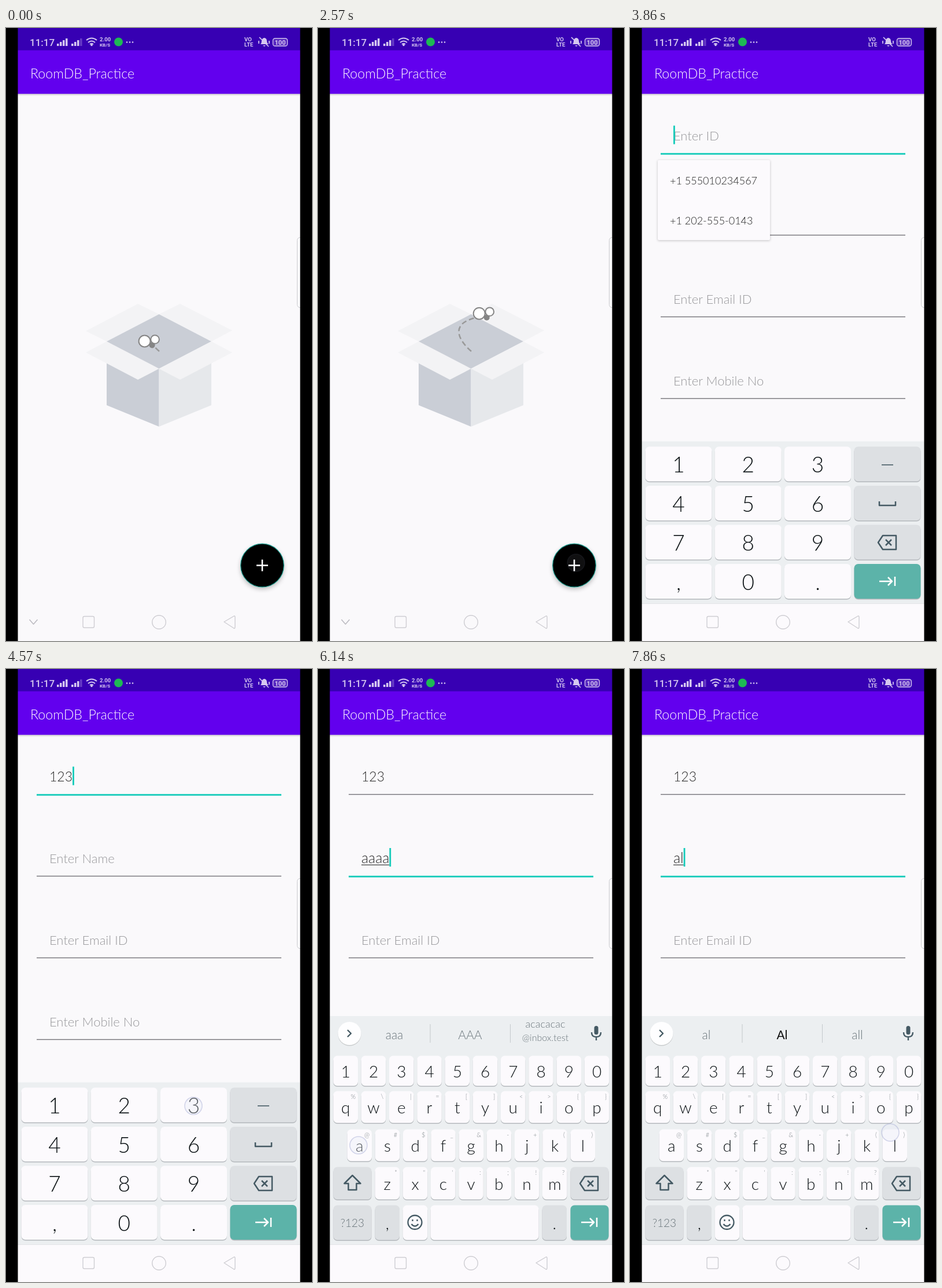
Animation, 529 px wide and 1058 px high, one loop 8 s. Source, as an HTML page:

```html
<!DOCTYPE html>
<html lang="en">
<head>
<meta charset="utf-8">
<title>Room database form</title>
<style>
  html, body { margin: 0; width: 100%; height: 100%; overflow: hidden; background: #000; }
  svg { display: block; width: 100vw; height: 100vh; }
  text { font-family: Lato, sans-serif; font-weight: 300; }
  .status text { font-family: Roboto, sans-serif; font-weight: 500; }
  .status .small { font-weight: 700; }
  .line { fill: none; stroke-linejoin: round; }
</style>
</head>
<body>
<svg id="stage" viewBox="0 0 529 1058"></svg>
<script>
const stage = document.getElementById('stage');
const INK = '#455a64', TEAL = '#13cbb9', PAGE = '#faf9fb', TRAY = '#eceff1', GREY = '#dde0e3';
const HINT = '#98989b', WORD = '#69747a', ENTER = '#5cb3a9';

// ---- markup helpers ----
const rect = (x, y, w, h, fill, more = '') =>
  `<rect x="${x}" y="${y}" width="${w}" height="${h}" fill="${fill}" ${more}/>`;
const circle = (x, y, r, fill, more = '') =>
  `<circle cx="${x}" cy="${y}" r="${r}" fill="${fill}" ${more}/>`;
const text = (x, y, size, fill, str, more = '') =>
  `<text x="${x}" y="${y}" font-size="${size}" fill="${fill}" ${more}>${str.replace(/&/g, '&amp;').replace(/</g, '&lt;')}</text>`;
const mid = 'text-anchor="middle"';
const poly = (points, fill) => `<polygon points="${points}" fill="${fill}"/>`;
const icon = (x, y, d, color = INK, width = 2.5) =>
  `<path class="line" transform="translate(${x} ${y})" d="${d}" stroke="${color}" stroke-width="${width}"/>`;
const group = (id, body, more = '') => `<g id="${id}" ${more}>${body}</g>`;

const key = (x, y, w, h, label = '', size = 28, fill = '#fcfafd', ink = '#0e1417') =>
  rect(x - .5, y + 1, w + 1, h + 1, '#b4b8bc', 'rx="7"') + rect(x - .5, y - .5, w + 1, h + 1, fill, 'rx="7"') +
  text(x + w / 2, y + h / 2 + size * .4, size, ink, label, mid);

const BACKSPACE = 'M-16 0L-8-12H15V12H-8ZM-3-5L7 5M7-5L-3 5';
const NEXT = 'M-14 0H8M1-7L8 0L1 7M13-8V8';

// ---- parts ----
function statusBar() {
  const pale = '#d5c8f0', small = 'class="small"';
  const bars = (x, last) => [0, 1, 2, 3].map(i =>
    rect(x + i * 5, 27 - i * 3, 3.5, 4 + i * 3, pale, i == 3 ? `opacity="${last}"` : '')).join('');
  return rect(20, 0, 489, 38.5, '#3700b3') +
    text(41, 31, 17, pale, '11:17') + bars(88, 1) + bars(113, .3) +
    icon(148, 24, 'M-9-3Q0-10 9-3M-6 1Q0-4 6 1M-3 4Q0 2 3 4', pale, 2) + circle(148, 29.5, 1.8, pale) +
    text(162, 23, 9.5, pale, '2.00', small) + text(162, 31.5, 8, pale, 'KB/S', small) +
    circle(194.5, 24, 7.5, '#1eb954') +
    [209, 214, 219].map(x => circle(x, 24.5, 1.3, pale)).join('') +
    text(412, 23, 9.5, pale, 'VO', small) + text(412, 32, 9.5, pale, 'LTE', small) +
    `<path d="M440 28Q442 26 442 22Q443 17 447 17Q451 18 451 23Q451 26 454 28ZM444 30H449L446.500 32Z" fill="${pale}"/>` +
    icon(446, 24, 'M-8-8L8 8M-9-2V3M9-2V3', pale, 1.7) +
    rect(461.5, 18, 25, 13, pale, `fill-opacity=".2" rx="3.500" stroke="${pale}" stroke-width="1.300"`) +
    text(474, 28.5, 11, pale, '100', mid + small);
}

const appBar = () =>
  rect(20, 113, 489, 4, '#000', 'opacity=".06"') + rect(20, 113, 489, 2, '#000', 'opacity=".10"') +
  rect(20, 38, 489, 75.6, '#6200ee') + text(42, 87, 23.2, '#fff', 'RoomDB_Practice');

const BOX_TRAIL = 'M265 558C250 545 238 528 246 515S272 502 291 493C330 482 352 455 340 432' +
  'S300 425 305 450S360 470 385 430S400 370 372 340';

function emptyPage() {
  const bug = circle(7, 4, 5, '#858585') +
    circle(-6, -3, 10, '#fff', 'stroke="#858585" stroke-width="2"') +
    circle(12, -6, 7.3, '#fff', 'stroke="#858585" stroke-width="2"');
  return rect(20, 0, 489, 1058, PAGE) +
    poly('138,523 228,476 264.500,494 174,541', '#f3f3f5') +
    poly('264.500,494 301,476 391,522 355,541', '#f3f3f5') +
    poly('174,541 264.500,494 355,541 264.500,588', '#caced6') +
    poly('174,541 264.500,588 264.500,688 174,651', '#caced6') +
    poly('264.500,588 355,541 355,651 264.500,688', '#e6e8eb') +
    poly('138,560 174,541 264.500,588 228,607', '#f3f3f5') +
    poly('264.500,588 355,541 391,560 301,607', '#f3f3f5') +
    `<path id="trail" d="${BOX_TRAIL}" fill="none" stroke="#999" stroke-width="2.500"/>` + group('bug', bug) +
    circle(443, 931, 37, '#000', 'opacity=".28" filter="url(#soft)"') +
    circle(443, 927.5, 37.3, '#000', 'stroke="#159c8e" stroke-width="1.200"') +
    icon(443, 927.5, 'M-10 0H10M0-10V10', '#fff', 2.6) + appBar();
}

const HINTS = ['Enter ID', 'Enter Name', 'Enter Email ID', 'Enter Mobile No'];

function formPage() {
  const fields = HINTS.map((hint, i) => {
    const y = 216.5 + i * 141;
    return text(75, y - 22.5, 22, HINT, hint, `id="field${i}"`) +
      rect(53, y - .7, 423, 1.4, '#737277', `id="rule${i}"`);
  }).join('');
  const popup = rect(48, 229, 194, 138, '#000', 'opacity=".22" filter="url(#thin)"') +
    rect(48, 228, 194, 138, '#fcfafd', 'rx="2"') +
    text(69, 270, 18, '#222', '+1 555010234567') + text(69, 339, 18, '#222', '+1 202-555-0143');
  return rect(20, 0, 489, 1058, PAGE) + appBar() + fields +
    text(265, 752.5, 16.8, '#222', 'SAVE', mid) +
    rect(75, 337.5, 0, 1.3, '#444', 'id="underline"') +
    rect(75, 0, 2.8, 32, TEAL, 'id="cursor"') + group('popup', popup);
}

function numberPad() {
  const cols = [27, 147.3, 267.5, 388], rows = [723, 790.5, 858, 925.5];
  const keys = [...'123 456 789 ,0. '].map((c, i) => {
    const side = i % 4 == 3;
    return key(cols[i % 4], rows[i >> 2], 114, 59, side ? '' : c, 37, side ? (i == 15 ? ENTER : GREY) : undefined);
  }).join('');
  return rect(20, 713.5, 489, 280, TRAY) + keys + icon(445, 754, 'M-10 0H10', INK, 1.6) +
    icon(445, 821, 'M-14-4V3H14V-4') + icon(445, 888, BACKSPACE) + icon(445, 955, NEXT, '#fff');
}

function letterPad() {
  const row = (chars, marks, x, y, h) => [...chars].map((c, i) => {
    const left = x + i * 48.25;
    return key(left, y, 41.5, h, c) +
      (marks[i] ? text(left + 38, y + 13, 11, '#7c8488', marks[i], 'text-anchor="end"') : '');
  }).join('');
  const tools =
    circle(115, 626.5, 7, 'none', `stroke="${INK}" stroke-width="2.300"`) + icon(118, 629, 'M2 2L11 11', INK, 2.8) +
    icon(186, 629, 'M-10-7Q-10-10-7-10H7Q10-10 10-7V3L3 10H-7Q-10 10-10 7ZM3 10V3H10M-5 0Q-1 6 4 1M-4-5V-3M4-5V-3', INK, 2.2) +
    text(254.5, 636, 18.5, INK, 'GIF', mid + ' style="font-weight:900;letter-spacing:1px"') +
    circle(325, 629.5, 6.4, 'none', `stroke="${INK}" stroke-width="4.800"`) +
    circle(325, 629.5, 9.8, 'none', `stroke="${INK}" stroke-width="3" stroke-dasharray="5.130"`) +
    rect(367.5, 614, 1, 30, '#c4c9cc') + [403, 411.5, 420].map(x => circle(x, 629, 2.7, INK)).join('');
  const words = [132, 263, 393].map((x, i) => text(x, 639, 21, WORD, '', `${mid} id="word${i}"`)).join('') +
    group('mail', text(393, 619, 18, WORD, 'acacacac', mid) + text(393, 642, 16, WORD, '@inbox.test', mid)) +
    rect(193.5, 613, 1, 32, '#c4c9cc') + rect(332, 613, 1, 32, '#c4c9cc');
  return rect(20, 599, 489, 395, TRAY) +
    circle(54.5, 630.5, 20, '#000', 'opacity=".15"') + circle(54.5, 629, 20, '#fefeff') +
    icon(54, 629, 'M3-6L-3 0L3 6', INK, 2.4).replace('<path', '<path id="chevron"') +
    group('tools', tools) + group('words', words) +
    rect(477.5, 616, 7, 15, INK, 'rx="3.500"') + icon(481, 629, 'M-8-2Q-8 6 0 6T8-2M0 6V12', INK, 2.4) +
    row('1234567890', '', 27, 668, 51) + row('qwertyuiop', '%\\|=[]<>{}', 27, 729, 54) +
    row('asdfghjkl', '@#$_&-+()', 51, 795, 54) + row('zxcvbnm', '*"\':;!?', 99, 860, 55) +
    key(27, 860, 65, 55, '', 28, GREY) + icon(59.5, 887, 'M0-13L14 1H7V12H-7V1H-14Z') +
    key(437, 860, 65, 55, '', 28, GREY) + icon(469, 888, BACKSPACE) +
    key(27, 926, 65, 59, '?123', 19, GREY, WORD) + key(99, 926, 41.5, 59, ',', 28, GREY) +
    key(147.3, 926, 41.5, 59) + icon(167.5, 955, 'M-12 0A12 12 0 1 1 12 0A12 12 0 1 1-12 0M-6 3Q0 10 6 3M-4-5V-2M4-5V-2', INK, 2.3) +
    key(195, 926, 186, 59) + key(388, 926, 41.5, 59, '.', 28, GREY) +
    key(437, 926, 65, 59, '', 28, ENTER) + icon(469, 955, NEXT, '#fff');
}

function navBar() {
  const soft = '#cfced3';
  return group('tray', rect(20, 993.5, 489, 65, '#fcfafd') + rect(20, 993, 489, 1, '#e3e4e7')) +
    group('down', icon(47.5, 1025, 'M-7-4L0 4L7-4', '#bcbbc1', 1.6)) +
    rect(133, 1015.5, 19.5, 19.5, 'none', `rx="2.500" stroke="${soft}" stroke-width="1.400"`) +
    circle(264.5, 1025.5, 11.8, 'none', `stroke="${soft}" stroke-width="1.400"`) +
    icon(387, 1025, 'M-10 0L7-10Q9-11 9-8V8Q9 12 7 11Z', soft, 1.4);
}

stage.innerHTML =
  `<defs><filter id="soft" x="-30%" y="-30%" width="160%" height="160%"><feGaussianBlur stdDeviation="4.500"/></filter>
   <filter id="thin"><feGaussianBlur stdDeviation="2"/></filter></defs>` +
  group('empty', emptyPage()) + group('form', formPage()) +
  group('numbers', numberPad()) + group('letters', letterPad()) +
  navBar() + group('status', statusBar(), 'class="status"') +
  rect(503.5, 361.5, 20, 121, '#fdfdff', 'rx="5" stroke="#c9c9cd"') +
  circle(0, 0, 15, '#e8eaf6', 'id="touch" fill-opacity=".35" stroke="#a9b0d8" stroke-opacity=".5" stroke-width="1.500"') +
  rect(0, 0, 20.5, 1058, '#000') + rect(508.5, 0, 21, 1058, '#000');

// ---- motion ----
const el = id => document.getElementById(id);
const show = (id, on) => el(id).style.display = on ? '' : 'none';
const move = (id, x, y) => el(id).setAttribute('transform', `translate(${x} ${y})`);
const set = (id, props) => { for (const p in props) el(id).setAttribute(p, props[p]); };
// value of the last [step, value] entry already reached
const latest = (list, n) => list.reduce((v, [step, value]) => n >= step ? value : v, list[0][1]);

const TOUCHES = [[0], [17, [446, 923]], [19], [23, [150, 192]], [25], [29, [84, 754]], [31, [204, 754]],
  [32, [324, 754]], [33, [445, 955]], [34], [38, [70, 822]], [44], [46, [469, 888]], [50], [53, [457, 815]], [55, [450, 800]]];
const ID_TEXT = [[0, ''], [30, '1'], [31, '12'], [32, '123']];
const NAME_TEXT = [[0, ''], [39, 'a'], [40, 'aa'], [42, 'aaa'], [43, 'aaaa'], [47, 'aaa'], [48, 'aa'], [49, 'a'], [53, 'al']];
const WORDS = [[0, ['', '', '']], [39, ['a', 'A', 'and']], [41, ['aa', 'AA', 'all']], [43, ['aaa', 'AAA', '']],
  [48, ['aa', 'AA', 'all']], [49, ['a', 'A', 'and']], [53, ['al', 'Al', 'all']]];

function flyBug(n) {
  const trail = el('trail'), length = trail.getTotalLength();
  const period = 15.5, s = 20 + (n % period) * 30;
  const p = trail.getPointAtLength(Math.min(s, length));
  const lead = 8 * Math.max(0, 1 - s / 70);
  move('bug', p.x - lead, p.y);
  const gone = s > length + 20;
  set('bug', { opacity: gone ? 0 : 1 });
  set('trail', { opacity: gone ? 0 : 1, 'stroke-dasharray': '9 5 '.repeat(Math.min(s, length) / 14) + '0 2000' });
}

function setField(i, value, size) {
  const field = el('field' + i);
  field.textContent = value || HINTS[i];
  set('field' + i, { fill: value ? '#2a2a2a' : HINT, 'font-size': value ? size : 22 });
  return value ? field.getComputedTextLength() : 0;
}

function draw(n) {
  const slide = latest([[0, 489], [19, 250], [20, 45], [21, 0]], n);
  show('empty', n < 21);
  show('form', n >= 19);
  move('empty', (slide - 489) * .25, 0);
  move('form', slide, 0);
  if (n < 21) flyBug(n);

  const focus = n < 24 ? -1 : n < 34 ? 0 : 1;
  const idWidth = setField(0, latest(ID_TEXT, n), 23);
  const nameWidth = setField(1, latest(NAME_TEXT, n), 25);
  HINTS.forEach((_, i) => {
    const active = i == focus;
    set('rule' + i, { y: 215.8 + i * 141, height: active ? 2.8 : 1.4, fill: active ? TEAL : '#737277' });
  });
  set('underline', { width: nameWidth });
  set('cursor', { x: 75 + (focus ? nameWidth : idWidth), y: focus ? 309 : 168.5 });
  show('cursor', focus >= 0 && n != 37);
  show('popup', n >= 27 && n < 30);

  show('numbers', n >= 25 && n < 34);
  move('numbers', 0, n == 25 ? 130 : 0);
  show('letters', n >= 34);
  show('tray', n >= 25);
  show('down', n < 25);

  const typing = n >= 39, words = latest(WORDS, n);
  show('tools', !typing);
  show('words', typing);
  show('mail', typing && !words[2]);
  words.forEach((word, i) => el('word' + i).textContent = word);
  set('word1', n >= 53 ? { fill: '#111', style: 'font-weight:400' } : { fill: WORD, style: '' });
  set('chevron', { d: typing ? 'M-3-6L3 0L-3 6' : 'M3-6L-3 0L3 6' });

  const touch = latest(TOUCHES, n);
  show('touch', touch);
  if (touch) {
    move('touch', ...touch);
    set('touch', { opacity: n < 19 ? .2 : 1 });
  }
}

let shown = -1;
function tick(now) {
  const step = Math.floor((now % 8000 + 5) * .007) % 56;
  if (step != shown) draw(shown = step);
  requestAnimationFrame(tick);
}
draw(0);
requestAnimationFrame(tick);
</script>
</body>
</html>
```
